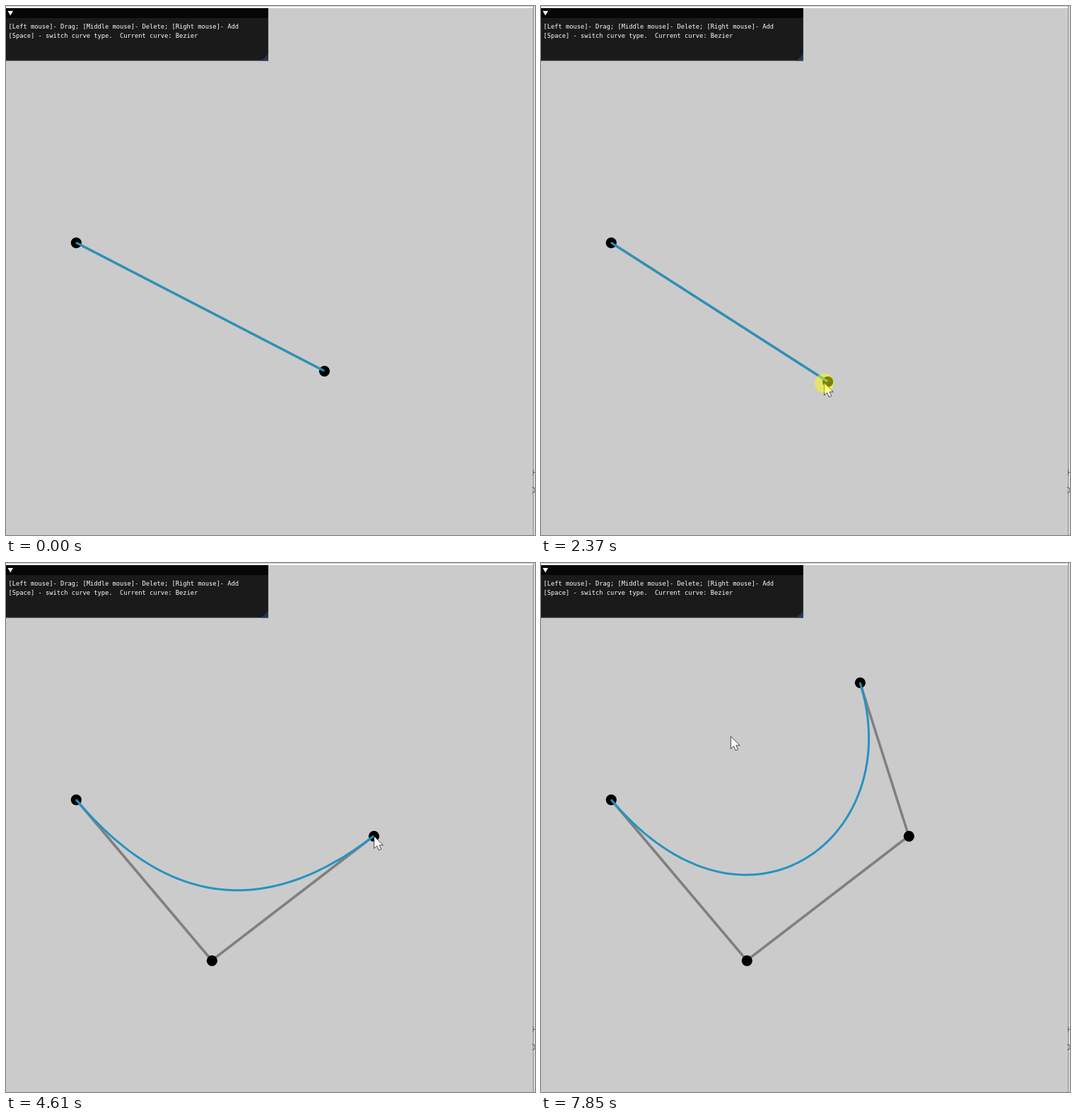
Write an HTML page with a canvas that moves like this. It is 748 by 748 pixels and loops after 8 s.

```html
<!DOCTYPE html>
<html lang="en">
<head>
<meta charset="utf-8">
<title>Curve editor</title>
<style>
  html, body { margin: 0; width: 100%; height: 100%; overflow: hidden; background: #cbcbcb; }
  canvas { display: block; }
</style>
</head>
<body>
<canvas id="stage" width="748" height="748"></canvas>
<script>
const ctx = document.getElementById('stage').getContext('2d');
const LOOP = 8000;

const easeIn = u => u * u;
const easeOut = u => 1 - easeIn(1 - u);
const easeInOut = u => u < .5 ? 4 * u ** 3 : 1 - 4 * (1 - u) ** 3;

// Mouse gestures: each one runs along a Bezier curve
const ENTER = [661, 747], GRAB = [448, 514], TURN = [222, 580];
const THIRD = [520, 386], FOURTH = [451, 169], REST = [268, 245];
const gestures = [
  { start: 340, end: 1680, ease: easeOut, route: [ENTER, GRAB] },
  { start: 1970, end: 2820, ease: easeIn, route: [GRAB, [342, 559], TURN] },
  { start: 2820, end: 4060, ease: easeInOut, route: [TURN, [267, 483], THIRD] },
  { start: 5090, end: 5910, ease: easeInOut, route: [THIRD, [434, 278], FOURTH] },
  { start: 7060, end: 7640, ease: easeInOut, route: [FOURTH, REST] }
];

const CLICK = 170;
const drag = { start: 1820, end: 2710, lag: 22 };
const clicks = [4110, 6400, 7680];
const isPressed = t => t >= drag.start && t < drag.end || clicks.some(c => t >= c && t < c + CLICK);

function bezier(points, u) {
  while (points.length > 1)
    points = points.slice(1).map((p, i) => p.map((c, k) => points[i][k] * (1 - u) + c * u));
  return points[0];
}

function mouseAt(t) {
  const { start, end, ease, route } = gestures.findLast(g => t >= g.start);
  return bezier(route, ease(Math.min(1, (t - start) / (end - start))));
}

function controlPoints(t) {
  const second = t < drag.start ? [450, 516] : t < drag.end ? mouseAt(t - drag.lag) : [291, 562];
  const points = [[99, 334.5], second];
  if (t >= 4610) points.push(THIRD);
  if (t >= 6890) points.push(FOURTH);
  return points;
}

function trace(points) {
  ctx.beginPath();
  points.forEach(p => ctx.lineTo(...p));
}
function line(points, color, width) {
  trace(points);
  ctx.strokeStyle = color;
  ctx.lineWidth = width;
  ctx.stroke();
}
function shape(points, color) {
  trace(points);
  ctx.closePath();
  ctx.fillStyle = color;
  ctx.fill();
}
function disc(x, y, r, color) {
  ctx.beginPath();
  ctx.arc(x, y, r, 0, 2 * Math.PI);
  ctx.fillStyle = color;
  ctx.fill();
}
function rect(x, y, w, h, color) {
  ctx.fillStyle = color;
  ctx.fillRect(x, y, w, h);
}

function drawWindow() {
  rect(0, 0, 748, 748, '#cbcbcb');
  rect(0, 1, 746, 2, '#fff');
  rect(746, 0, 2, 748, '#d8d8d8');
  rect(745, 0, 1, 748, '#8c8c8c');

  // Letters cut off by the right edge
  rect(745, 655, 1, 9, '#555');
  rect(746, 659, 2, 1, '#555');
  ctx.beginPath();
  ctx.arc(744, 684.5, 4, -Math.PI / 2, Math.PI / 2);
  ctx.strokeStyle = '#555';
  ctx.lineWidth = 1;
  ctx.stroke();
}

function drawPanel() {
  rect(0, 3, 371, 74.5, '#1a1a1a');
  rect(0, 3, 371, 14, '#050605');
  shape([[2.5, 7], [10, 7], [6.25, 13.5]], '#fff');
  shape([[371, 67.5], [371, 77.5], [361, 77.5]], '#21364e');
  line([[370.6, 3], [370.6, 77.1], [0, 77.1]], 'rgba(110, 110, 128, .5)', .75);
  ctx.font = '8.72px "DejaVu Sans Mono", monospace';
  ctx.fillStyle = '#fff';
  ctx.fillText('[Left mouse]- Drag; [Middle mouse]- Delete; [Right mouse]- Add', 3.5, 31.5);
  ctx.fillText('[Space] - switch curve type.\u00a0 Current curve: Bezier', 3.5, 44.5);
}

function drawCurve(points) {
  line(points, '#808080', 3.6);
  points.forEach(([x, y]) => disc(x + .3, y + .3, 7.6, '#000'));
  line(Array.from({ length: 101 }, (_, i) => bezier(points, i / 100)), '#2394c0', 3);
}

function drawMouse([x, y], pressed) {
  const arrow = [[0, 0], [0, 17.4], [4.1, 13.7], [6.9, 19.9], [10.2, 18.5], [7.4, 12.7], [12.8, 12.7]];
  shape(arrow.map(([dx, dy]) => [x + dx + .4, y + dy + .2]), '#fff');
  ctx.strokeStyle = '#222';
  ctx.lineWidth = .8;
  ctx.stroke();
  if (pressed) disc(x + .5, y + .5, 13.5, 'rgba(255, 255, 0, .5)');
}

function render(t) {
  drawWindow();
  drawPanel();
  drawCurve(controlPoints(t));
  if (t >= gestures[0].start) drawMouse(mouseAt(t), isPressed(t));
}

const begin = performance.now();
function tick() {
  render((performance.now() - begin) % LOOP);
  requestAnimationFrame(tick);
}
tick();
</script>
</body>
</html>
```
